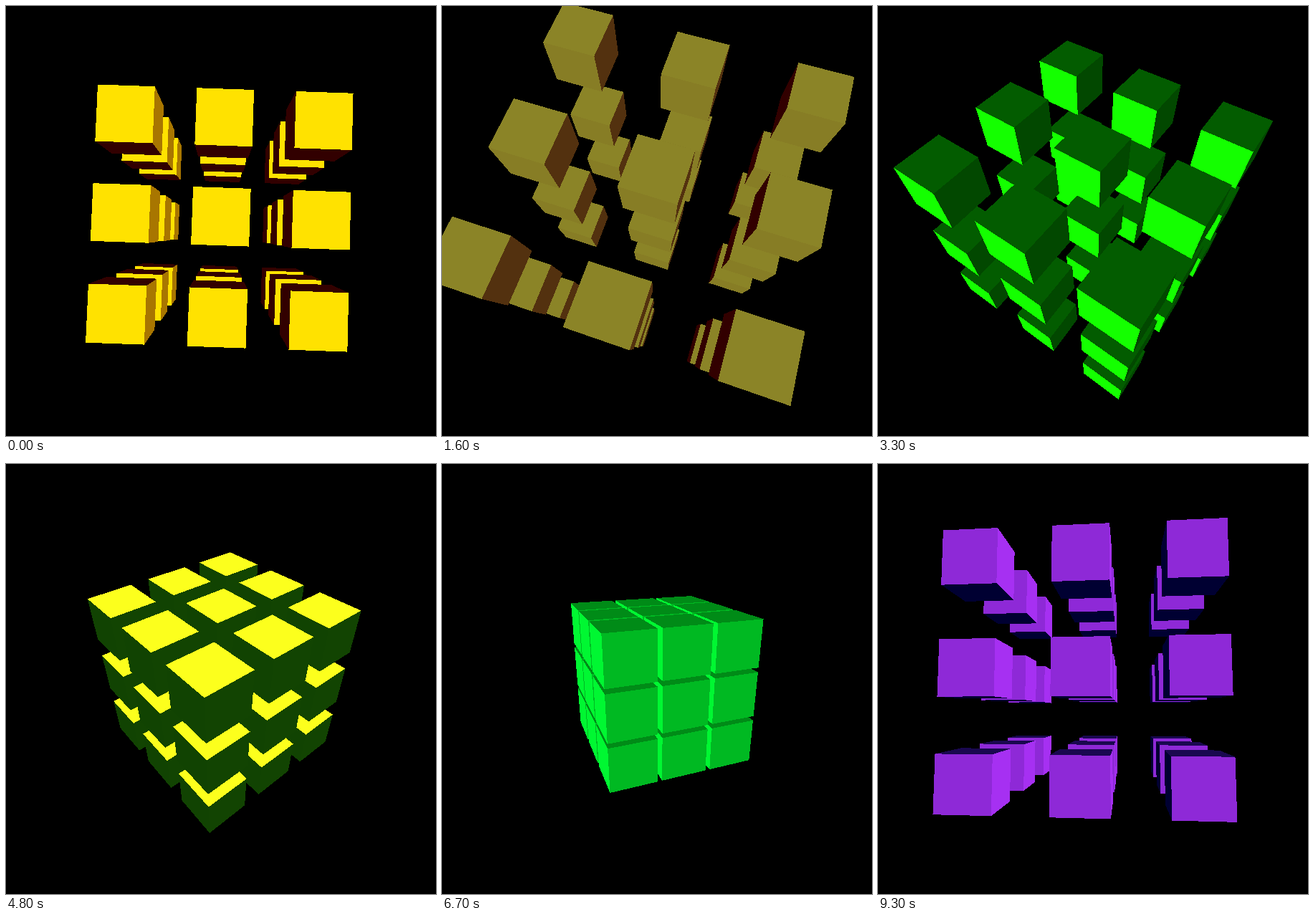
An HTML page for the animation above (9.4 s loop, 600 by 600 pixels).

```html
<!DOCTYPE html>
<html lang="en">
<head>
<meta charset="utf-8">
<title>Cube lattice</title>
<style>
  html, body { margin: 0; width: 100%; height: 100%; overflow: hidden; background: #000; }
  svg { display: block; width: 600px; height: 600px; shape-rendering: crispEdges; }
</style>
</head>
<body>
<svg id="stage" viewBox="0 0 600 600"></svg>
<script>
const stage = document.getElementById('stage');
const STEPS = 94, STEP_MS = 100;
const CAMERA = 300 / Math.tan(Math.PI / 6);
const HALF = 30;
const AMBIENT = 50;

// The lamp wanders between a few spots; x and y are its slant towards the viewer
const LAMP = [
  { at: 0, x: 0.52, y: -0.02, color: '#ffff00' },
  { at: 9, x: -0.67, y: 0.26, color: '#ff796f' },
  { at: 23, x: 0.77, y: 0.78, color: '#00ff00' },
  { at: 33, x: -0.79, y: 0.97, color: '#14ff00' },
  { at: 48, x: -0.01, y: -0.98, color: '#fdff1d' },
  { at: 67, x: -0.63, y: -0.06, color: '#00ff41' },
  { at: 93, x: 1, y: -0.26, color: '#dc40ff' }
];

const CORNERS = [[-1, -1], [1, -1], [1, 1], [-1, 1]];
const AXES = [0, 1, 2];

const dot = (a, b) => a[0] * b[0] + a[1] * b[1] + a[2] * b[2];
const add = (a, b) => a.map((v, i) => v + b[i]);
const mix = (a, b, k) => a + (b - a) * k;
const toCamera = ([x, y, z]) => [-x, -y, CAMERA - z];
const distance = p => Math.hypot(...toCamera(p));
const channel = (color, i) => parseInt(color.substr(1 + 2 * i, 2), 16);

function lightAt(step) {
  const i = Math.max(1, LAMP.findIndex(spot => spot.at >= step));
  const a = LAMP[i - 1], b = LAMP[i];
  const k = (step - a.at) / (b.at - a.at);
  const x = mix(a.x, b.x, k), y = mix(a.y, b.y, k);
  const length = Math.hypot(x, y, 1);
  const glowing = Math.round(step / 45); // ambient goes red, green, blue
  return {
    dir: [x / length, y / length, 1 / length],
    color: AXES.map(c => mix(channel(a.color, c), channel(b.color, c), k)),
    ambient: AXES.map(c => c === glowing ? AMBIENT : 0)
  };
}

// Turn about z, then about x, by the same angle
function rotator(angle) {
  const c = Math.cos(angle), s = Math.sin(angle);
  return ([x, y, z]) => {
    const turned = x * s + y * c;
    return [x * c - y * s, turned * c - z * s, turned * s + z * c];
  };
}

function project([x, y, z]) {
  const scale = CAMERA / (CAMERA - z);
  return [300 + x * scale, 300 + y * scale].map(v => v.toFixed(2));
}

function makeFace(axis, side, rotate, light) {
  const place = (u, v, w) => {
    const p = [];
    p[axis] = w;
    p[(axis + 1) % 3] = u;
    p[(axis + 2) % 3] = v;
    return rotate(p);
  };
  const normal = place(0, 0, side);
  const diffuse = Math.max(0, dot(normal, light.dir));
  const rgb = AXES.map(c =>
    Math.min(255, Math.round(light.ambient[c] + light.color[c] * diffuse)));
  return {
    normal,
    corners: CORNERS.map(([u, v]) => place(u * HALF, v * HALF, side * HALF)),
    fill: `rgb(${rgb})`
  };
}

function faceMarkup(face, center) {
  const points = face.corners.map(corner => add(corner, center));
  if (dot(face.normal, toCamera(points[0])) <= 0) return '';
  return `<polygon points="${points.map(project).join(' ')}" fill="${face.fill}"/>`;
}

function draw(step) {
  const rotate = rotator((step + 2) * Math.PI / 180);
  const light = lightAt(step);
  // Spacing bounces evenly between 57 and 143
  const spacing = 57 + 2 * Math.abs(43 - Math.abs(step - 19.5));
  const faces = AXES.flatMap(axis =>
    [-1, 1].map(side => makeFace(axis, side, rotate, light)));

  const centers = [];
  for (const x of [-1, 0, 1])
    for (const y of [-1, 0, 1])
      for (const z of [-1, 0, 1])
        centers.push(rotate([x * spacing, y * spacing, z * spacing]));
  centers.sort((a, b) => distance(b) - distance(a));

  stage.innerHTML = centers
    .flatMap(center => faces.map(face => faceMarkup(face, center)))
    .join('');
}

let shown = -1;
function tick() {
  const step = Math.floor(performance.now() / STEP_MS) % STEPS;
  if (step !== shown) draw(shown = step);
  requestAnimationFrame(tick);
}
tick();
</script>
</body>
</html>
```
